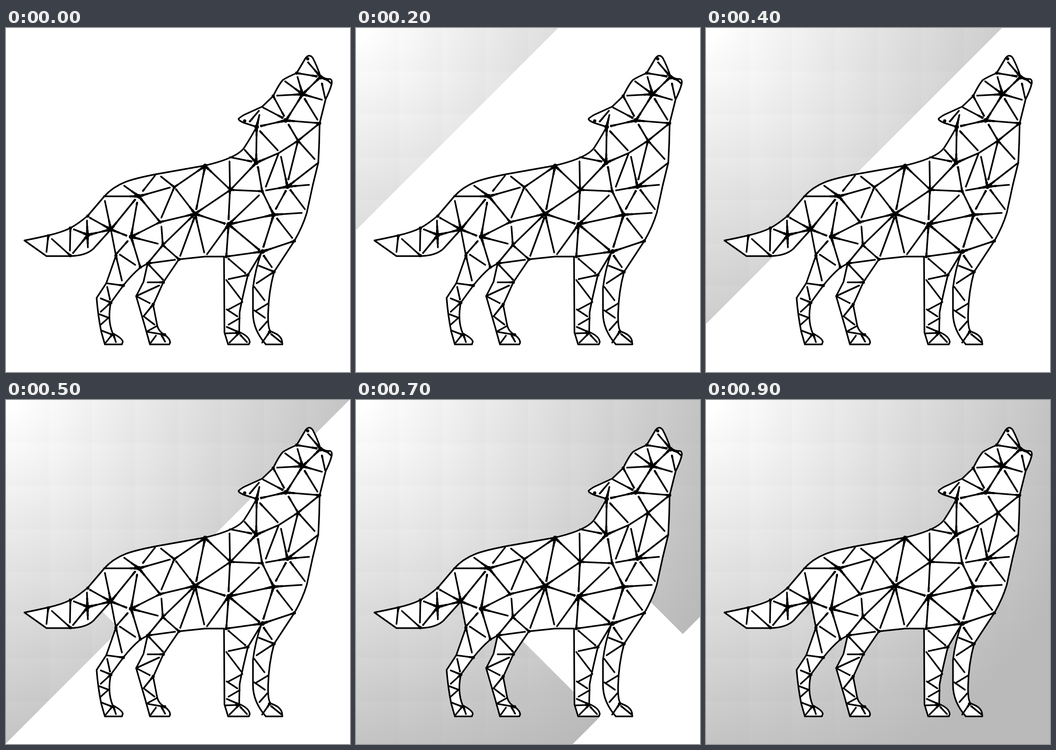
An HTML page with a canvas that plays this animation: 748x748 px, repeating every 1000 ms.

```html
<!DOCTYPE html>
<html>
<head>
<meta charset="utf-8">
<style>
html, body { margin: 0; overflow: hidden; background: #fff; }
canvas { display: block; }
</style>
</head>
<body>
<canvas id="stage" width="748" height="748"></canvas>
<script>
const S = 748, CELLS = S * S, STEP = 100, STEPS = 10;
// How far the flood has travelled around the wolf at each step
const REACH = [0, 310, 439, 539, 643, 746, 1022, 1219, 1395, Infinity];

const BACK = `M40 462 Q66 457 92 451 Q122 444 140 435 Q158 425 178 408 L213 367
  C240 336 274 328 326 318 L433 299 C480 288 511 274 520 257 Q530 242 545 215
  L520 207 Q504 201 506 197 Q514 190 524 186 L557 171 L581 148 Q593 123 602 113
  Q613 106 632 98 L651 66 Q659 55 667 65 Q677 84 684 106 Q695 111 705 111
  Q710 113 708 122 Q704 137 695 155 L682 207 L681 250 L679 293 L667 342 L654 402
  Q645 432 627 463 L583 530`;
const FRONT = ` Q571 574 570 620 Q569 655 576 660 Q597 667 600 680 L601 688 L565 688
  Q537 656 537 620 L537 565 Q542 525 555 489 L526 537 Q513 590 508 618
  L507 661 Q529 670 530 683 L528 688 L483 688 L475 662 L474 497 L433 497 L376 503`;
const REAR = ` L342 553 L320 602 L329 648 Q333 661 345 667 Q357 676 357 684 L355 688
  L313 688 L303 652 L283 583 L299 552 L308 512 L292 521 Q272 538 255 560
  L228 597 Q220 635 232 664 Q252 674 254 682 L252 688 L215 688 L207 660
  Q200 625 197 587 L218 555 L239 495 L228 438 L190 480 Q174 495 140 496 L88 496 Z`;

const WEBS = [
  // tail and rump
  `M92 451L88 487 M100 459L138 493 M140 435L139 484 M178 450L146 489 M148 438L178 450
   M176 419L178 477 M183 413L228 438L178 450 M215 376L228 438L261 451 M213 366L289 366L257 343
   M228 438L280 374 M285 380L272 454L292 520 M298 354L324 321 M264 464L241 490
   M248 493L281 515 M239 495L252 549 M272 454L330 469`,
  // flank
  `M356 347L289 366L335 422L272 454 M337 323L366 346L433 300L414 393 M366 346L338 412
   M370 351L411 404L335 422 M338 432L341 472L376 503 M411 404L341 472L308 512L367 504
   M433 300L488 352L411 404L475 425 M486 290L487 352L484 415 M409 414L379 495
   M411 404L431 488 M484 427L437 492 M484 427L479 497L558 486 M484 427L550 482`,
  // chest
  `M484 427L550 364 M484 427L582 406L560 475 M488 352L557 355L582 406L643 402
   M488 352L544 293L593 272L635 245L682 207 M590 415L622 456 M587 393L608 355
   M659 341L612 345L679 293 M619 353L650 394 M566 353L612 345L598 280 M593 272L565 345
   M635 245L614 329 M548 303L557 355 M635 245L671 285 M615 211L635 245 M558 486L627 463`,
  // neck and head
  `M545 215L544 293L519 265 M553 225L591 266 M487 281L533 290 M555 213L608 201L682 207
   M559 173L601 195 M581 148L604 190 M590 147L645 144L612 196 M607 116L645 144L634 107
   M645 144L684 106 M645 144L687 156 M650 155L677 199 M687 121L694 153 M632 98L675 105
   M684 106L657 75 M550 180L530 203 M545 215L551 189 M684 106L700 114L707 121`,
  // hind legs
  `M218 555L255 560 M220 563L226 590 M206 588L228 597L206 617
   M202 622L223 630L206 645 M208 658L234 668L239 683 M229 669L217 684
   M308 512L341 547 M308 553L342 553 M333 560L283 583L312 598 M320 601L299 627
   M302 629L323 645 M328 648L308 659 M309 661L345 667 M326 669L315 684 M338 668L346 682`,
  // front legs
  `M484 502L520 533 M484 546L526 537 M479 548L511 590 M514 596L484 612 M480 612L503 627
   M508 631L484 645 M480 650L503 660 M478 664L507 663L486 684 M510 668L524 683
   M561 496L578 520 M550 517L583 530L545 555 M540 563L562 592 M570 599L545 614
   M540 614L563 630 M568 638L551 657 M573 661L557 684 M577 666L598 683`
].map(d => new Path2D(d));
const BIG = `545 215 608 201 645 144 684 107 544 293 433 300 612 345 582 406 484 427
  411 404 289 366 228 438 272 454 178 450 558 486`;
const SMALL = `682 207 635 245 488 352 557 355 366 346 341 472 335 422 239 495 308 512
  376 503 479 497 583 530 526 537 255 560 342 553 228 597 627 463 581 148 632 98
  140 435 178 409 92 452 140 495 320 601 234 667 345 667 507 663 573 661 292 520
  656 67 519 202`;

const ctx = stage.getContext("2d");
const newLayer = () => Object.assign(document.createElement("canvas"), { width: S, height: S }).getContext("2d");

function discs(list, r) {
  const n = list.trim().split(/\s+/).map(Number), path = new Path2D();
  for (let i = 0; i < n.length; i += 2) {
    path.moveTo(n[i] + r, n[i + 1]);
    path.arc(n[i], n[i + 1], r, 0, 2 * Math.PI);
  }
  return path;
}

function drawWolf() {
  const g = newLayer(), outline = new Path2D(BACK + FRONT + REAR);
  const strokeWebs = width => {
    g.lineWidth = width;
    WEBS.forEach(web => g.stroke(web));
  };
  // Webs swell close to the nodes
  const swell = (nodes, r, width) => {
    g.save();
    g.clip(discs(nodes, r));
    strokeWebs(width);
    g.restore();
  };
  g.lineJoin = g.lineCap = "round";
  g.fillStyle = "#fff";
  g.fill(outline);
  g.fillStyle = "#000";
  g.lineWidth = 3.5;
  g.stroke(outline);
  strokeWebs(3.6);
  swell(BIG, 20, 4.4);
  swell(BIG, 11, 5.6);
  swell(SMALL, 9, 4.4);
  g.fill(discs(BIG, 5));
  g.fill(discs(SMALL, 3.5));
  return g;
}

// Walking distance from the top left corner, with the wolf as a wall
function flood(pixels) {
  const dist = new Int32Array(CELLS).fill(-1), queue = new Int32Array(CELLS);
  let end = 1;
  dist[0] = 0;
  for (let head = 0; head < end; head++) {
    const p = queue[head], x = p % S;
    const visit = q => {
      if (dist[q] < 0 && pixels[q * 4 + 3] < 128) {
        dist[q] = dist[p] + 1;
        queue[end++] = q;
      }
    };
    if (x > 0) visit(p - 1);
    if (x < S - 1) visit(p + 1);
    if (p >= S) visit(p - S);
    if (p < CELLS - S) visit(p + S);
  }
  return dist;
}

// Radial grey with a faint 8 by 8 tiling
function grey(x, y) {
  const r = Math.min(1, Math.hypot(x, y) / 870), tile = S / 8;
  const saw = ((x % tile) + (y % tile)) / tile - 1;
  return 255 - 69 * r - (r < 1 ? 3 * saw * Math.min(1, 4 - 4 * r) : 0);
}

const wolf = drawWolf();
const dist = flood(wolf.getImageData(0, 0, S, S).data);
const back = ctx.createImageData(S, S);
for (let p = 0; p < CELLS; p++) {
  back.data.fill(grey(p % S, Math.floor(p / S)), p * 4, p * 4 + 3);
}

const start = performance.now();
let shown = -1;
function frame() {
  const step = Math.floor((performance.now() - start) / STEP) % STEPS;
  if (step !== shown) {
    shown = step;
    for (let p = 0; p < CELLS; p++) {
      back.data[p * 4 + 3] = dist[p] >= 0 && dist[p] < REACH[step] ? 255 : 0;
    }
    ctx.putImageData(back, 0, 0);
    ctx.drawImage(wolf.canvas, 0, 0);
  }
  requestAnimationFrame(frame);
}
frame();
</script>
</body>
</html>
```
